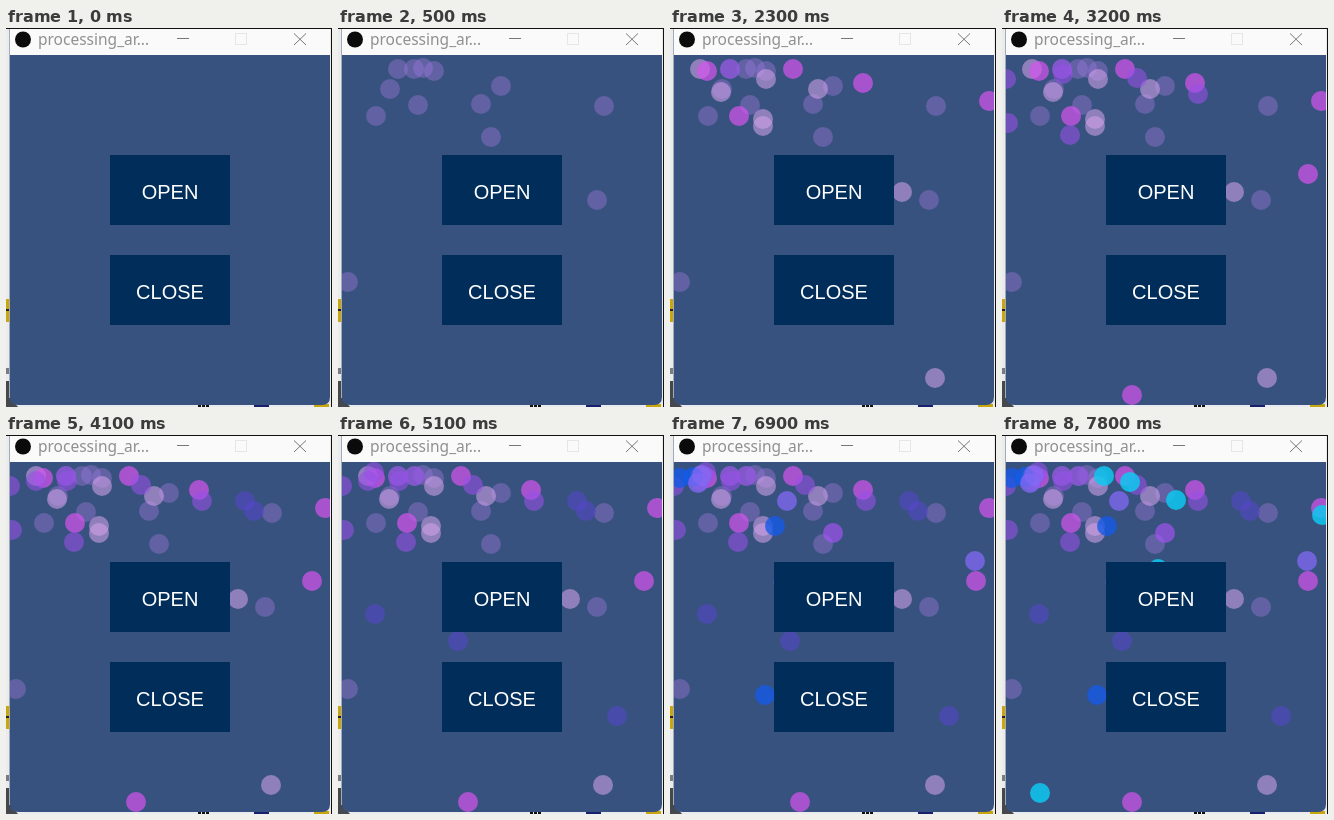
Recreate the animation shown at these times as an HTML page. Size 326 by 379 pixels, loop 8000 ms.

```html
<!DOCTYPE html>
<html lang="en">
<head>
<meta charset="utf-8">
<title>Button window</title>
<style>
html, body { margin: 0; width: 100%; height: 100%; overflow: hidden; background: #fff; }
svg { display: block; width: 100vw; height: 100vh; }
.title { font: 15.5px "Noto Sans", sans-serif; fill: #909090; }
.label { font: 20px "Liberation Sans", Arial, sans-serif; fill: #fff; text-anchor: middle; }
</style>
</head>
<body>
<svg viewBox="0 0 326 379">
  <defs>
    <clipPath id="pane"><path d="M4 27H324V369Q324 377 316 377H12Q4 377 4 369Z"/></clipPath>
  </defs>

  <!-- desktop showing around the window -->
  <rect width="326" height="379" fill="#e9ebee"/>
  <rect y="271" width="4" height="23" fill="#c9a60c"/>
  <path d="M0 282H3" stroke="#222" stroke-width="2"/>
  <rect y="340" width="4" height="6" fill="#777c82"/>
  <path d="M0 353H4V369L12 379H0Z" fill="#45494d"/>
  <path d="M192 378H203" stroke="#111" stroke-width="2" stroke-dasharray="3 1"/>
  <rect x="248" y="376" width="15" height="3" fill="#16206e"/>
  <rect x="308" y="376" width="15" height="3" fill="#c9a60c"/>
  <path d="M3.5 1V370" stroke="#a5abb5"/>
  <path d="M0 .5H326M325.5 0V379" stroke="#111"/>

  <!-- title bar -->
  <rect x="4" y="1" width="320" height="26" fill="#fbfafa"/>
  <circle cx="17" cy="11.5" r="8" fill="#0b0b0b"/>
  <text class="title" x="32" y="17">processing_ar...</text>
  <g fill="none" stroke="#777">
    <path d="M171 10.5H183"/>
    <rect x="229.5" y="5.5" width="11" height="11" stroke="#e6e6e6"/>
    <path d="M288 5.5L300 17M300 5.5L288 17"/>
  </g>

  <!-- sketch -->
  <g clip-path="url(#pane)">
    <rect x="4" y="27" width="320" height="350" fill="#37527e"/>
    <g id="dots"></g>
    <g fill="#002d5a">
      <rect x="104" y="127" width="120" height="70"/>
      <rect x="104" y="227" width="120" height="70"/>
    </g>
    <text class="label" x="164" y="171">OPEN</text>
    <text class="label" x="164" y="271">CLOSE</text>
  </g>
</svg>
<script>
const LOOP = 8000;
const MAUVE = "rgba(160,120,220,.4)", PINK = "rgba(215,165,235,.55)",
      MAGENTA = "rgba(215,85,240,.7)", VIOLET = "rgba(150,80,230,.6)",
      INDIGO = "rgba(85,70,200,.6)", BLUE = "rgba(20,90,230,.8)",
      IRIS = "rgba(130,105,245,.75)", CYAN = "rgba(15,200,240,.85)";

// [start in ms, colour, "x,y" centres]
const bursts = [
  [500, MAUVE, "60,41 76,41 85,40 96,43 52,61 80,77 38,88 143,76 163,58 153,109 266,78 259,172 10,254"],
  [1400, PINK, "30,41 51,64 96,51 93,91 93,98 148,61 232,164 265,350"],
  [2300, MAGENTA, "37,43 123,41 193,55 319,73 69,88"],
  [2300, VIOLET, "60,41"],
  [3200, VIOLET, "61,46 135,50 196,66 4,51 6,95 68,107"],
  [3200, MAGENTA, "306,146 130,367"],
  [4100, INDIGO, "239,66 248,76"],
  [4100, VIOLET, "30,46"],
  [5100, INDIGO, "37,179 120,206 279,281"],
  [5100, VIOLET, "36,37 77,41"],
  [6000, BLUE, "10,43 23,42 105,91 95,260"],
  [6000, MAGENTA.replace("215", "160"), "163,98"],
  [6900, IRIS, "32,40 28,48 117,66 305,126 113.5,147"],
  [7800, CYAN, "102,41 128,47 174,65 320,80 156,134 38,358"]
];

const NS = "http://www.w3.org/2000/svg";
const layer = document.getElementById("dots");

const groups = bursts.map(([start, fill, points]) => {
  const el = document.createElementNS(NS, "g");
  el.setAttribute("fill", fill);
  for (const point of points.split(" ")) {
    const [x, y] = point.split(",");
    const dot = document.createElementNS(NS, "circle");
    dot.setAttribute("cx", x);
    dot.setAttribute("cy", y);
    dot.setAttribute("r", 10);
    el.append(dot);
  }
  layer.append(el);
  return { start, el };
});

function draw(t) {
  for (const { start, el } of groups) {
    el.setAttribute("visibility", t >= start ? "visible" : "hidden");
  }
}

const begin = performance.now();
function tick() {
  draw((performance.now() - begin) % LOOP);
  requestAnimationFrame(tick);
}
tick();
</script>
</body>
</html>
```
